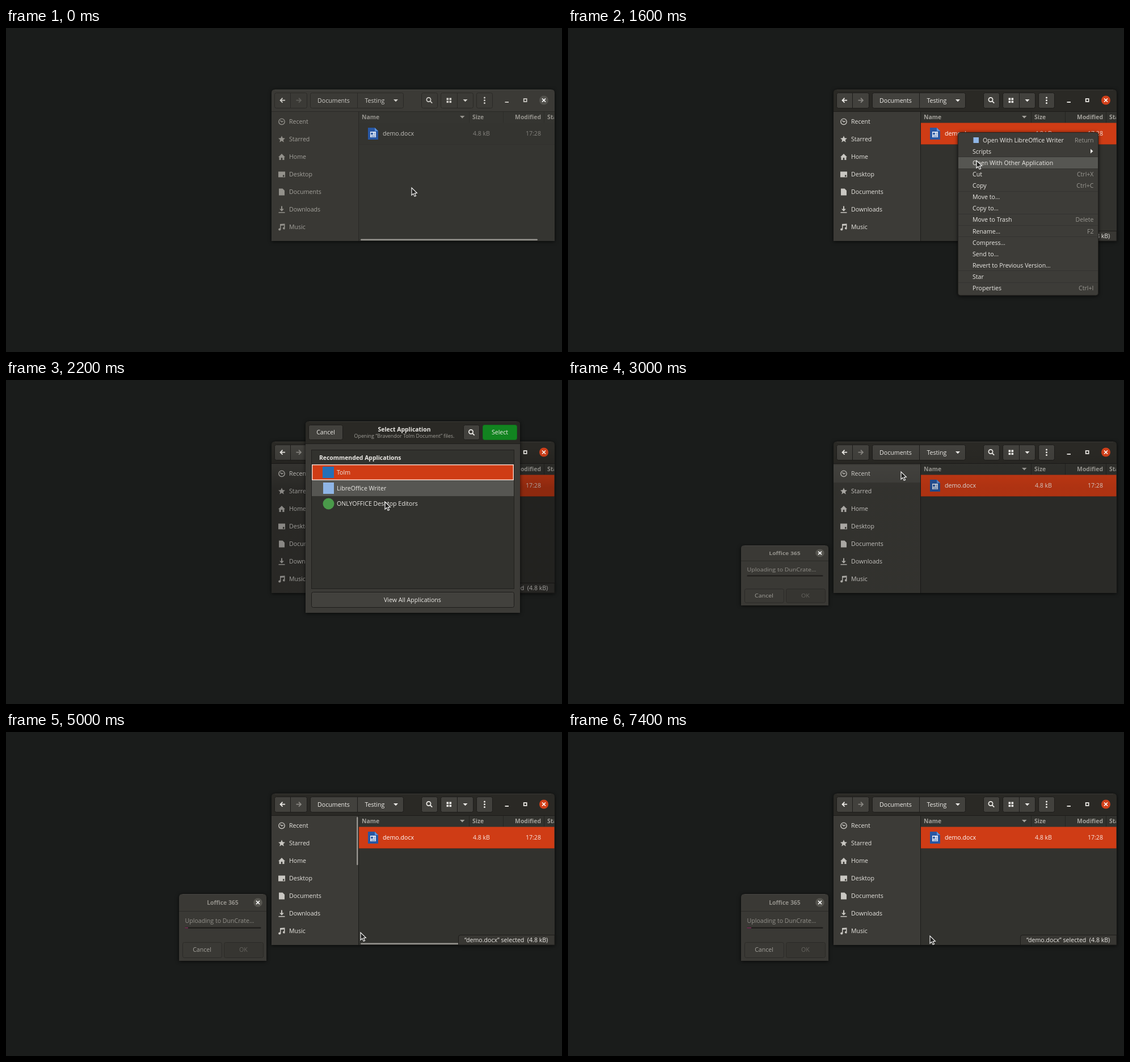
An HTML page that plays this animation: 980x572 px, repeating every 8000 ms.

```html
<!DOCTYPE html>
<html lang="en">
<head>
<meta charset="utf-8">
<title>Open with another application</title>
<style>
html, body { margin: 0; width: 100%; height: 100%; overflow: hidden; background: #1a1c1b; }
svg { display: block; width: 980px; height: 572px; }
text { font: 10.6px "Open Sans", "Noto Sans", sans-serif; fill: #eceae6; white-space: pre; }
.b { font-weight: 700; font-size: 10.4px; }
.small { font-size: 8.9px; fill: #a19f99; }
.mid { text-anchor: middle; }
.end { text-anchor: end; }
.key { fill: #999791; }
.soft { fill: #a3a19b; }
.faint { fill: #93918b; }
.off { fill: #66645f; }
.btn { fill: #42413d; stroke: #1e1d1b; }
.line { fill: none; stroke: #2b2a27; }
.shade { filter: drop-shadow(0 1px 3px #000b); }

#win {
  --head: #3b3a36; --side: #393834; --main: #353531; --btn: #3b3a36; --edge: #2a2926;
  --tx: #a3a19b; --ico: #93918b; --sym: #cfcdc8; --dim: #5f5e59; --col: #95938d;
  --row: #343430; --name: #c3c1bc; --cell: #85837e; --close: #53524d;
}
#win.focus {
  --head: #2a2925; --side: #3c3b37; --main: #32322e; --btn: #42413d; --edge: #1d1c1a;
  --tx: #e6e4df; --ico: #c9c7c2; --sym: #f0eeea; --dim: #8a8883; --col: #a3a19b;
  --row: #cf3c15; --name: #fff; --cell: #f8e6e0; --close: #d2401a;
}
#win .btn { fill: var(--btn); stroke: var(--edge); }
#win .line { stroke: var(--edge); }
.head { fill: var(--head); }
.side { fill: var(--side); }
.main { fill: var(--main); }
.row { fill: var(--row); }
.close { fill: var(--close); }
.tx { fill: var(--tx); }
.name { fill: var(--name); }
.cell { fill: var(--cell); }
.col { fill: var(--col); }
.ico { fill: var(--ico); }
.ring { fill: none; stroke: var(--ico); stroke-width: 1.4; }
.sym { fill: var(--sym); }
.pen { fill: none; stroke: var(--sym); stroke-width: 1.7; }
.dim { stroke: var(--dim); }
</style>
</head>
<body>
<svg id="stage" viewBox="0 0 980 572"></svg>
<script>
const stage = document.getElementById('stage');
const $ = id => document.getElementById(id);

// Drawing helpers; text is placed by its vertical centre.
const text = (x, y, s, cls = '') => `<text x="${x}" y="${y + 3.8}" class="${cls}">${s}</text>`;
const rect = (x, y, w, h, attrs = '') => `<rect x="${x}" y="${y}" width="${w}" height="${h}" ${attrs}/>`;
const path = (d, attrs = '') => `<path d="${d}" ${attrs}/>`;
const dot = (x, y, r, attrs) => `<circle cx="${x}" cy="${y}" r="${r}" ${attrs}/>`;
const group = (id, body, attrs = '') => `<g id="${id}" ${attrs}>${body}</g>`;
const button = (x, y, w, h, attrs = 'class="btn"') => rect(x + .5, y + .5, w - 1, h - 1, `rx="3" ${attrs}`);
const topRound = (x, y, w, h, attrs) =>
  path(`M${x} ${y + h}v${6 - h}q0-6 6-6h${w - 12}q6 0 6 6v${h - 6}z`, attrs);
const cross = (x, y) => path(`M${x - 3} ${y - 3}l6 6m0-6l-6 6`, 'stroke="#fff" stroke-width="1.7"');
const lens = (x, y, attrs) => dot(x - 1, y - 1, 3.6, attrs) + path(`M${x + 1.6} ${y + 1.6}l3.6 3.6`, attrs);

const PLACES = ['Recent', 'Starred', 'Home', 'Desktop', 'Documents', 'Downloads', 'Music'];
const PITCH = 31.05;
const placeY = i => 165.3 + PITCH * i;

function placeIcons() {
  const shapes = [
    dot(0, 0, 5.2, 'class="ring"') + path('M-2.5-2L0 .5L2.6-1', 'class="ring"'),
    path('M0-6L1.7-2L6-1.7L2.7 1.1L3.8 5.4L0 3L-3.8 5.4L-2.7 1.1L-6-1.7L-1.7-2z', 'class="ico"'),
    path('M-6 .5L0-5.5L6 .5H4.5V5.5H1.3V1.5H-1.3V5.5H-4.5V.5z', 'class="ico"'),
    path('M-6-5H6V5H-6zM2 1V4H4.5V1z', 'class="ico" fill-rule="evenodd"'),
    path('M-5-6H1.5L5-2.5V6H-5z', 'class="ico"'),
    path('M-1-6H1V-1H4L0 3.2L-4-1H-1zM-5.5 4.5H5.5V6H-5.5z', 'class="ico"'),
    path('M-3-5.5L5.5-6V3.5A2.2 2 0 1 1 4 0V-3L-1.5-2.6V4.2A2.2 2 0 1 1-3 2z', 'class="ico"')
  ];
  return shapes.map((s, i) => `<g transform="translate(486 ${placeY(i)})">${s}</g>`).join('');
}

function headerBar() {
  const arrow = (x, s, cls) => path(`M${x + 4.5 * s} 127.7h${-8.5 * s}m${4 * s}-4l${-4 * s} 4l${4 * s} 4`, `class="${cls}"`);
  const down = x => path(`M${x - 4} 126h8l-4 4.2z`, 'class="sym"');
  const bar = (x, w, split) => button(x, 114, w, 28) + (split ? path(`M${split} 115v26`, 'class="line"') : '');
  let s = topRound(468, 108.5, 499, 39, 'class="head"') + rect(474, 109, 487, 1, 'fill="#fff" opacity=".06"');
  s += bar(473, 58, 501.5) + bar(536, 165, 619.5) + bar(732, 29) + bar(766, 58, 795.5) + bar(829, 29);
  s += arrow(487.5, 1, 'pen') + arrow(516, -1, 'pen dim');
  s += text(577.5, 127.7, 'Documents', 'mid sym') + text(632.5, 127.7, 'Testing', 'sym') + down(687) + down(809.5);
  s += lens(746, 127.5, 'class="pen"');
  for (let i = 0; i < 4; i++) s += rect(776.5 + 5 * (i % 2), 123.5 + 5 * (i >> 1), 3.6, 3.6, 'class="sym"');
  for (let i = -1; i < 2; i++) s += dot(843.5, 127.7 + 4.7 * i, 1.5, 'class="sym"');
  s += rect(879.5, 130, 6.5, 1.8, 'class="sym"') + rect(912.7, 125, 5, 5, 'class="pen"');
  return s + dot(948, 127.5, 8, 'class="close"') + cross(948, 127.5);
}

function fileRow() {
  let s = rect(622, 167.5, 344.5, 38, 'class="row"');
  s += path('M638 176h12l6 6v15h-18z', 'fill="#2857a3"') + path('M650 176l6 6h-6z', 'fill="#5b93dd"');
  s += rect(642, 183, 10, 10, 'fill="#e8eef8"');
  s += path('M643.5 185h3v3h-3zM648 185.5h3M648 187.5h3M643.5 190h7.5M643.5 191.8h7.5', 'fill="#2857a3" stroke="#2857a3" stroke-width=".7"');
  return s + text(664, 186.5, 'demo.docx', 'name') + text(853, 186.5, '4.8 kB', 'cell end') + text(943, 186, '17:28', 'cell end');
}

function fileWindow() {
  let s = headerBar();
  s += rect(468, 147, 154, 229, 'class="side"') + rect(622, 147, 345, 229, 'class="main"');
  PLACES.forEach((p, i) => {
    s += rect(468, placeY(i) - 15.3, 153, 31, `id="hover${i}" fill="#fff" opacity="0"`) + text(499, placeY(i), p, 'tx');
  });
  s += placeIcons() + path('M468 147.5H967M621.5 148V376', 'class="line"');
  s += text(627, 157, 'Name', 'b col') + text(822, 157, 'Size', 'b col') + text(943, 157, 'Modified', 'b col end');
  s += `<g clip-path="url(#edge)">${text(954, 157, 'Star', 'b col')}</g>`;
  s += path('M800 155h8.5l-4.2 4.5z', 'class="col"');
  s += path('M816.5 148v19M876.5 148v19M948.5 148v19M622 205.5H967', 'class="line" opacity=".6"') + fileRow();
  s += rect(625, 372.5, 312, 2.5, 'id="hbar" rx="1.2" fill="#94928d"');
  s += rect(618, 150, 2.5, 85, 'id="vbar" rx="1.2" fill="#94928d"');
  s += group('status', path('M797.5 376v-14q0-3.5 3.5-3.5H967v17.5z', 'fill="#383733" stroke="#1d1c1a"') +
    text(808, 367.3, '“demo.docx” selected\u00a0 (4.8 kB)'));
  s += topRound(468, 108.5, 499, 267.5, 'id="dim" fill="url(#dimmer)"');
  return group('win', s, 'class="shade"');
}

function contextMenu() {
  const sections = [
    ['Open With LibreOffice Writer|Return', 'Scripts'], ['Open With Other Application'], ['Cut|Ctrl+X', 'Copy|Ctrl+C'],
    ['Move to…', 'Copy to…'], ['Move to Trash|Delete'], ['Rename…|F2'],
    ['Compress…', 'Send to…', 'Revert to Previous Version…'], ['Star'], ['Properties|Ctrl+I']
  ];
  let s = rect(687.5, 184.5, 247, 287.5, 'rx="4" fill="#3d3c38" stroke="#23221f"');
  s += rect(688, 228, 246, 20, 'id="menuHover" fill="#565652"');
  let y = 198;
  sections.forEach((items, i) => {
    if (i) {
      s += path(`M688 ${Math.round(y - 10.2) + .5}h246`, 'stroke="#343330"');
      y += .68;
    }
    items.forEach((item, j) => {
      const [label, key = ''] = item.split('|');
      s += text(i || j ? 713 : 731, y, label) + text(926.5, y, key, 'key end');
      y += 19.7;
    });
  });
  s += rect(714.5, 193, 9.5, 10, 'fill="#8fb5e6"') + path('M921 213.5l4.5 4l-4.5 4z', 'fill="#eceae6"');
  return group('menu', s, 'class="shade"');
}

function chooser() {
  const rowY = i => 163 + 27.8 * i;
  let s = topRound(528, 73, 378, 338, 'fill="#3c3b37"') + topRound(528, 73, 378, 39, 'fill="#2a2925"');
  s += path('M528 112.5H906', 'stroke="#1e1d1b"') + path('M534 73.5H900', 'stroke="#fff" opacity=".08"');
  s += button(533, 79, 61, 27) + button(806, 79, 29, 27) + button(840, 79, 61, 27, 'fill="#128420" stroke="#11701c"');
  s += text(563.5, 92.5, 'Cancel', 'mid') + text(870.5, 92.5, 'Select', 'mid');
  s += lens(820.5, 92.5, 'fill="none" stroke="#f0eeea" stroke-width="1.7"');
  s += text(702, 87, 'Select Application', 'b mid') + text(702, 98.6, 'Opening “Bravendor Tolm Document” files.', 'small mid');
  s += rect(538.5, 123.5, 357, 245, 'fill="#32322e" stroke="#201f1d"') + text(552, 137, 'Recommended Applications', 'b');
  s += rect(539.7, 149.7, 354.6, 26.6, 'fill="#cf3c15" stroke="#f6dcd2" stroke-width="1.4"');
  s += rect(539, 177, 356, 28, 'id="appHover" fill="#565652"');
  s += rect(558, 153, 20, 20, 'fill="#2470b8"') + rect(559, 181, 19, 20, 'fill="#8fb5e6"') + dot(568.5, 218.5, 10, 'fill="#4a9a4a"');
  ['Tolm', 'LibreOffice Writer', 'ONLYOFFICE Desktop Editors'].forEach((app, i) => { s += text(583, rowY(i), app); });
  s += button(538, 374, 358, 28) + text(716.5, 387.7, 'View All Applications', 'mid');
  return group('chooser', s, 'class="shade"');
}

function uploader() {
  let s = topRound(305, 286, 154, 118, 'fill="#3a3935"') + path('M305 316.5H459', 'class="line"');
  s += path('M311 286.5H453', 'stroke="#fff" opacity=".07"') + text(382, 301, 'Loffice 365', 'b mid faint');
  s += dot(444, 301, 7.8, 'fill="#56554f"') + cross(444, 301) + text(315.5, 333, 'Uploading to DunCrate...', 'faint');
  s += rect(315.5, 344.5, 134, 2.5, 'rx="1" fill="#201f1d"') + rect(315.5, 345, 0, 1.5, 'id="bar" fill="#83305f"');
  s += button(311, 371, 70, 28, 'class="line"') + button(384, 371, 70, 28, 'fill="#363531" stroke="#2b2a27"');
  s += text(345.5, 384.5, 'Cancel', 'mid soft') + text(418.5, 384.5, 'OK', 'mid off');
  return group('uploader', s, 'class="shade"');
}

stage.innerHTML = `<defs>
  <clipPath id="edge">${rect(622, 147, 344, 229)}</clipPath>
  <linearGradient id="dimmer" gradientUnits="userSpaceOnUse" x1="0" y1="118" x2="0" y2="190">
    <stop offset="0" stop-opacity="0"/><stop offset="1" stop-opacity=".32"/>
  </linearGradient></defs>` + fileWindow() + contextMenu() + chooser() + uploader() +
  group('cursor', path('M0 0V13.2L3 10.4L5.2 15.4L7.5 14.4L5.3 9.6L9.4 9.3z', 'fill="#20201e" stroke="#fff" stroke-width="1.1"'));

const LOOP = 8000, STEP = 200;
const ramp = (t, a, b) => Math.min(1, Math.max(0, (t - a) / (b - a)));
const ease = k => k * k * (3 - 2 * k);

// Pointer moves: leave, arrive, x, y.
const MOVES = [
  [0, 600, 687, 184], [800, 1600, 720, 234], [1800, 2200, 668, 215], [2400, 2800, 587, 162],
  [3550, 3800, 607, 258], [3800, 4400, 612, 348], [4600, 5400, 638, 360]
];
function pointer(t) {
  let x = 715, y = 282;
  for (const [leave, arrive, toX, toY] of MOVES) {
    const k = ease(ramp(t, leave, arrive));
    x += (toX - x) * k;
    y += (toY - y) * k;
  }
  return [x, y];
}

const show = (id, opacity) => $(id).setAttribute('opacity', +opacity);

// Dialogs open by unfolding vertically around their centre line.
function unfold(id, visible, t, opens, y) {
  const k = .9 + .1 * ramp(t, opens, opens + STEP);
  $(id).setAttribute('visibility', visible ? 'visible' : 'hidden');
  $(id).setAttribute('transform', `translate(0 ${y * (1 - k)}) scale(1 ${k})`);
}

function draw(t) {
  const during = (a, b = LOOP) => t >= a && t < b;
  const [x, y] = pointer(t);
  $('cursor').setAttribute('transform', `translate(${x} ${y})`);

  $('win').classList.toggle('focus', during(800));
  show('dim', ramp(t, 1600, 2000) - ramp(t, 2800, 3200));
  show('status', during(800, 3000) || during(3400));
  show('hbar', during(0, 1000) || during(5000) * (1 - ramp(t, 7000, 7400)));
  show('vbar', during(3400) * (1 - ramp(t, 5600, 6000)));

  show('menu', during(800, 1800));
  show('menuHover', y >= 228);
  unfold('chooser', during(1800, 3000), t, 1800, 242);
  show('appHover', during(2200, 2800));
  unfold('uploader', during(3000), t, 3000, 345);
  $('bar').setAttribute('width', during(3400) * (2 + 5.6 * ramp(t, 3400, 6000)));

  // The place under the pointer lights up; the one just left fades.
  const over = during(3000) && x < 621 ? Math.floor((y - 150) / PITCH) : -9;
  const falling = y - pointer(t - STEP)[1] > 15;
  PLACES.forEach((p, i) => show('hover' + i, i === over ? .055 : falling && i === over - 1 ? .03 : 0));
}

const start = performance.now();
function tick() {
  const t = (performance.now() - start) % LOOP;
  draw(Math.floor(t / STEP) * STEP);
  requestAnimationFrame(tick);
}
tick();
</script>
</body>
</html>
```
